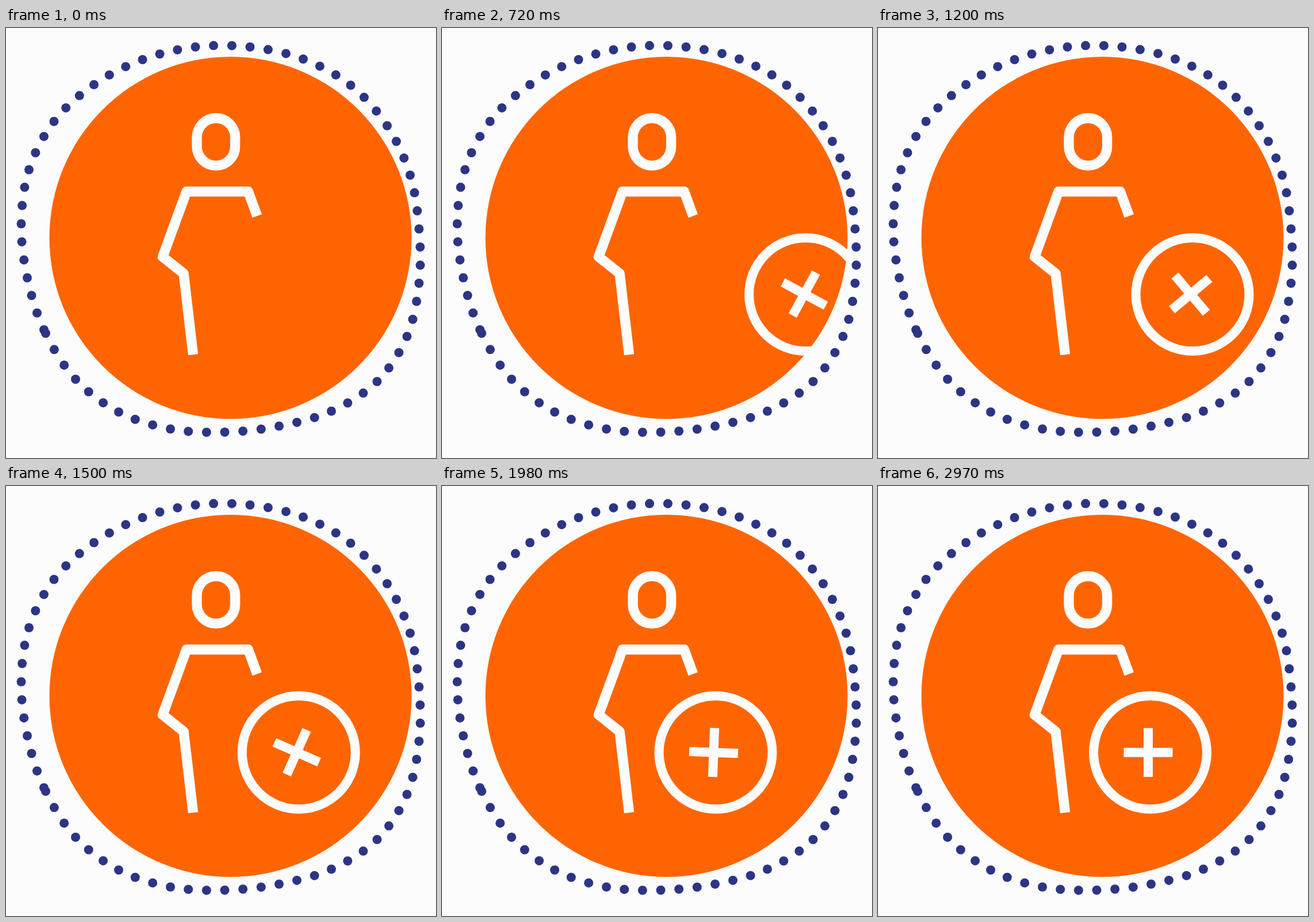
These frames come from a looping animation (748x748 px, 3.6 s). An HTML page:

```html
<!DOCTYPE html>
<html lang="en">
<head>
<meta charset="utf-8">
<title>Person with wheel</title>
<style>
  html, body { margin: 0; width: 100%; height: 100%; overflow: hidden; background: #fcfcfc; }
  svg { display: block; width: 100%; height: 100%; }
  .line { fill: none; stroke: #fcfcfc; }
  #dots { fill: #2c3584; }
</style>
</head>
<body>
<svg viewBox="0 0 748 748">
  <circle cx="390.5" cy="365" r="315" fill="#fe6502"/>
  <g class="line" stroke-width="17.4" stroke-linejoin="round">
    <rect x="332" y="156.8" width="66.6" height="82.6" rx="33.3"/>
    <path d="M436.8 327 421.3 284.5H314L272.5 398 309 427 325.5 568.3"/>
  </g>
  <g id="wheel" class="line" stroke-width="16">
    <circle r="98.5"/>
    <path id="plus" d="M-46 0H39M-3.5-42.5V42.5"/>
  </g>
  <g id="dots"></g>
</svg>
<script>
const LOOP = 3600, STEP = 30;
const wheel = document.getElementById('wheel');
const plus = document.getElementById('plus');

// Knots of the dotted outline; the first and last only shape the ends.
const knots = [
  [116.7, 606], [66, 525], [37, 434.5], [26.5, 340.5], [40, 246.5], [83.5, 162.5],
  [153, 98.5], [237.5, 55], [329.5, 33], [424.5, 33], [517, 54], [599.5, 99.5],
  [663, 170], [703, 256], [718.5, 349.5], [718.5, 444], [697.5, 536.5],
  [645.5, 615], [566, 666.5], [475, 692.5], [380.5, 703], [286, 697.5],
  [196, 668], [121, 611], [69, 531], [38.5, 440.5]
];

// Catmull-Rom interpolation between b and c.
const spline = (a, b, c, d, s) =>
  b + s * (c - a + s * (2 * a - 5 * b + 4 * c - d + s * (3 * (b - c) + d - a))) / 2;

function drawDots() {
  const dots = document.getElementById('dots');
  const perSpan = 3, count = (knots.length - 3) * perSpan;
  for (let n = 0; n <= count; n++) {
    const i = Math.min(Math.floor(n / perSpan), knots.length - 4);
    const at = axis => spline(...knots.slice(i, i + 4).map(k => k[axis]), n / perSpan - i);
    const dot = document.createElementNS('http://www.w3.org/2000/svg', 'circle');
    dot.setAttribute('cx', at(0));
    dot.setAttribute('cy', at(1));
    dot.setAttribute('r', 8);
    dots.append(dot);
  }
}

const distance = t => 342 * Math.max(0, 1 - t / 2130) ** 1.855;

function angle(t) {
  const left = Math.max(0, 2190 - t) / 1000;
  return left ** 2 * (49.8 + 1.26 * left ** 3.6);
}

function pulse(t) {
  const p = (t - 2550) / 420;
  return p > 0 && p < 1 ? 1 - 0.18 * Math.sin(Math.PI * p) : 1;
}

function render(now) {
  const t = Math.floor((now % LOOP) / STEP) * STEP;
  wheel.setAttribute('transform', `translate(${473.5 + distance(t)} 463.5) scale(${pulse(t)})`);
  plus.setAttribute('transform', `rotate(${angle(t)} -2.7 0)`);
}

drawDots();
render(0);
let start;
requestAnimationFrame(function tick(now) {
  start ??= now;
  render(now - start);
  requestAnimationFrame(tick);
});
</script>
</body>
</html>
```
